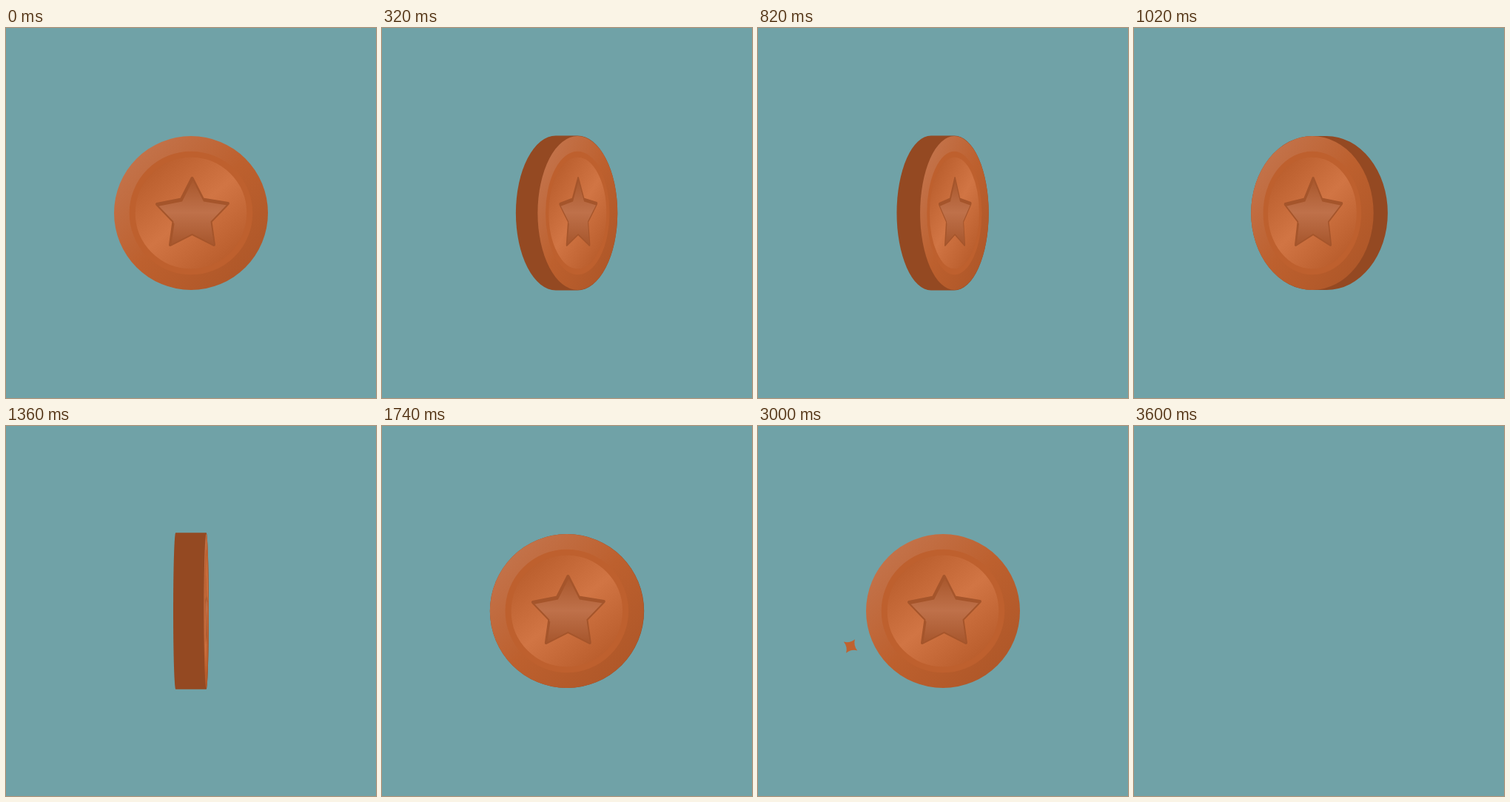
Animation, 500 px wide and 500 px high, one loop 3.62 s. Source, as an HTML page:

```html
<!DOCTYPE html>
<html lang="en">
<head>
<meta charset="utf-8">
<title>Spinning coin</title>
<style>
  html, body { margin: 0; width: 100%; height: 100%; overflow: hidden; background: #70a2a7; }
  svg { display: block; width: 100%; height: 100%; }
</style>
</head>
<body>
<svg viewBox="0 0 500 500">
  <defs>
    <linearGradient id="rim" gradientUnits="userSpaceOnUse" x1="-74" y1="-74" x2="74" y2="74">
      <stop offset="0" stop-color="#c37249"/>
      <stop offset=".5" stop-color="#bd602e"/>
      <stop offset="1" stop-color="#b05829"/>
    </linearGradient>
    <linearGradient id="disc" gradientUnits="userSpaceOnUse" x1="-48" y1="-58" x2="48" y2="58">
      <stop offset="0" stop-color="#bc602f"/>
      <stop offset=".5" stop-color="#d17544"/>
      <stop offset="1" stop-color="#bb5f2e"/>
    </linearGradient>
    <linearGradient id="metal" gradientUnits="userSpaceOnUse" x1="0" y1="-48" x2="0" y2="44">
      <stop offset="0" stop-color="#a8572c"/>
      <stop offset=".48" stop-color="#bf714a"/>
      <stop offset="1" stop-color="#a5542a"/>
    </linearGradient>
    <path id="star" stroke-width="4" stroke-linejoin="round"
      d="M1.5-47L16-18.500L50-13L26.500 11.500L31 43L1.500 28L-28 43L-23.500 11.500L-46-12L-13-18.500Z"/>
    <clipPath id="coinClip"><circle r="104"/></clipPath>
    <clipPath id="starClip"><use href="#star"/></clipPath>
  </defs>
  <rect width="500" height="500" fill="#70a2a7"/>
  <g id="coin">
    <path id="body" fill="#944922"/>
    <g id="face">
      <circle r="104" fill="url(#rim)"/>
      <circle r="80" fill="url(#disc)"/>
      <use href="#star" fill="#a5552b" stroke="#a5552b"/>
      <g clip-path="url(#starClip)">
        <use href="#star" transform="translate(1 3)" fill="url(#metal)"/>
      </g>
      <g clip-path="url(#coinClip)">
        <g transform="rotate(40)">
          <rect id="shine" x="-160" width="320" height="83" fill="#fff" opacity=".5"/>
        </g>
      </g>
      <circle r="79.300" fill="none" stroke="#be602e" stroke-width="8"/>
    </g>
  </g>
  <g id="sparks" fill="#c0622f"></g>
</svg>
<script>
const LOOP = 3620, STEP = 20, R = 104;
const $ = id => document.getElementById(id);
const coin = $('coin'), body = $('body'), face = $('face'), shine = $('shine');

const sparks = [
  { x: 370, y: 200, r: 13, from: 2340, span: 520 },
  { x: 125, y: 297.500, r: 13, from: 2860, span: 440 },
  { x: 370, y: 200, r: 11, from: 3000, span: 410 }
];
for (const s of sparks) {
  s.el = document.createElementNS('http://www.w3.org/2000/svg', 'path');
  s.el.setAttribute('d', 'M0-1Q.25-.25 1 0Q.25.25 0 1Q-.25.25-1 0Q-.25-.25 0-1Z');
  $('sparks').append(s.el);
}

const show = (el, on) => el.setAttribute('visibility', on ? 'visible' : 'hidden');

// Turn of the face: 0 is frontal, +1 and -1 are edge-on right and left.
function turn(t) {
  const first = 404, half = 480, last = first + 2 * half, end = 1760;
  if (t >= end) return 0;
  if (t < first) return (t / first) ** 1.65;
  if (t < last) return -1 + 2 * ((t - first) % half) / half;
  return -(((end - t) / (end - last)) ** 1.65);
}

function drawCoin(x) {
  const a = Math.abs(x);
  const w = Math.max(R * (1 - a ** 1.9), 0.01);
  const h = R + 2 * a ** 4;
  const front = 250 + 21 * x;
  const back = 250 - 21 * x * (1 + 0.2 * (1 - a));
  const l = Math.min(front, back), r = Math.max(front, back);
  body.setAttribute('d',
    `M${l} ${250 - h}H${r}A${w} ${h} 0 0 1 ${r} ${250 + h}H${l}A${w} ${h} 0 0 1 ${l} ${250 - h}Z`);
  show(body, a > 0);
  face.setAttribute('transform', `translate(${front} 250) scale(${w / R} 1)`);
}

function drawShine(t) {
  const u = (t - 1900) / 405;
  show(shine, u > 0 && u < 1);
  shine.setAttribute('y', 146 - 292 * u - 41.5);
}

function drawSpark(s, t) {
  const u = (t - s.from) / s.span;
  const on = u > 0 && u < 1;
  show(s.el, on);
  if (!on) return;
  const size = s.r * Math.sin(Math.PI * u);
  s.el.setAttribute('transform',
    `translate(${s.x} ${s.y}) rotate(${180 * (0.5 - u)}) scale(${size})`);
}

function draw(t) {
  coin.setAttribute('display', t < 3600 ? 'inline' : 'none');
  drawCoin(turn(t));
  drawShine(t);
  for (const s of sparks) drawSpark(s, t);
}

const start = performance.now();
function tick() {
  const t = (performance.now() - start) % LOOP;
  draw(Math.floor(t / STEP) * STEP);
  requestAnimationFrame(tick);
}
tick();
</script>
</body>
</html>
```
